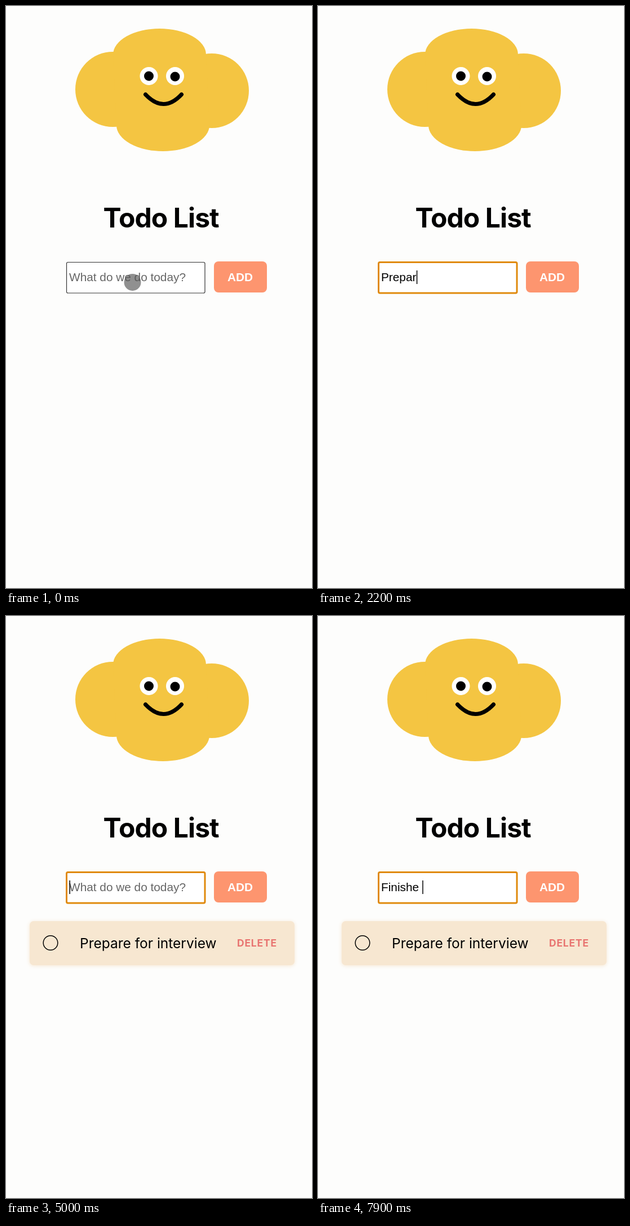
Write an HTML page that moves like this. It is 543 by 1030 pixels and loops after 8 s.

```html
<!DOCTYPE html>
<html lang="en">
<head>
<meta charset="utf-8">
<title>Todo List</title>
<style>
  html, body { margin: 0; width: 100%; height: 100%; overflow: hidden; background: #fdfdfc; }
  svg { display: block; width: 543px; height: 1030px; }
  text { white-space: pre; font-family: Inter, sans-serif; }
  .field { font: 20.8px "Liberation Sans", Arial, sans-serif; }
</style>
</head>
<body>
<svg viewBox="0 0 543 1030">
  <g fill="#f4c542">
    <circle cx="189.500" cy="147.500" r="66.500"/>
    <circle cx="365" cy="150" r="66"/>
    <ellipse cx="272.500" cy="86" rx="82.500" ry="46"/>
    <ellipse cx="278.500" cy="211" rx="82.500" ry="46"/>
    <path d="M190 86H355L361 211H196Z"/>
  </g>
  <g fill="#fff"><circle cx="253.500" cy="124" r="16"/><circle cx="300" cy="124" r="16"/></g>
  <circle cx="253.500" cy="124" r="8.500"/><circle cx="300" cy="125" r="8.500"/>
  <path d="M247.500 156.500Q279.500 190.500 311.500 156.500" fill="none" stroke="#000" stroke-width="7" stroke-linecap="round"/>

  <text x="172.500" y="392" font-size="48" font-weight="700" letter-spacing="-0.9">Todo List</text>

  <rect id="box" x="107.500" y="453.500" width="245.500" height="54.500" rx="2.500" fill="#fff"/>
  <text id="entry" class="field" x="112" y="487"></text>
  <rect id="caret" y="468" width="1.500" height="24"/>
  <rect x="369" y="452" width="94" height="55" rx="8" fill="#fd956f"/>
  <text class="field" x="393" y="487" fill="#fff" style="font-weight:700">ADD</text>

  <g id="item">
    <rect x="42" y="540" width="470" height="78" rx="7" fill="#f7e7d1" style="filter:drop-shadow(0 1px 3px #f7e7d1)"/>
    <circle cx="79" cy="578.500" r="12.800" fill="none" stroke="#000" stroke-width="1.500"/>
    <text x="131" y="588" font-size="24.500">Prepare for interview</text>
    <text x="410" y="585" font-size="17.500" font-weight="700" letter-spacing="0.8" fill="#e87470">DELETE</text>
  </g>

  <circle id="touch" r="15" fill="#555" fill-opacity=".65"/>
  <path id="move" transform="translate(243 481)" stroke="#fff" stroke-width="1.500" paint-order="stroke" stroke-linejoin="round"
    d="M0-12L5-6H1.500V-1.500H6V-5L12 0L6 5V1.500H1.500V6H5L0 12L-5 6H-1.500V1.500H-6V5L-12 0L-6-5V-1.500H-1.500V-6H-5Z"/>
</svg>
<script>
const LOOP = 8000, FOCUS = 400, SWAP = 1000, SUBMIT = 5000;
const [box, entry, caret, item, touch, move] =
  ["box", "entry", "caret", "item", "touch", "move"].map(id => document.getElementById(id));

// Each keystroke has its own time.
const first = "Prepare for interview";
const firstKeys = [1400, 1700, 1800, 2000, 2100, 2200, 2400, 2600, 2800, 2900, 3100, 3300,
  3500, 3700, 3900, 4000, 4200, 4300, 4400, 4500, 4700];
const second = "Finishe ";
const secondKeys = [6300, 6600, 6700, 6800, 7000, 7200, 7700, 7900];

const typed = (text, keys, t) => text.slice(0, keys.filter(k => k <= t).length);
const show = (el, on) => el.setAttribute("visibility", on ? "visible" : "hidden");

function set(el, attrs) {
  for (const name in attrs) el.setAttribute(name, attrs[name]);
}

function draw(t) {
  const focused = t >= FOCUS;
  const value = t < SUBMIT ? typed(first, firstKeys, t) : typed(second, secondKeys, t);
  set(box, { stroke: focused ? "#e08a0c" : "#333", "stroke-width": focused ? 3 : 1.2 });

  entry.textContent = value || "What do we do today?";
  entry.setAttribute("fill", value ? "#000" : "#666");
  const width = value ? entry.getComputedTextLength() : 0;
  const blink = t >= 5600 && t < 6000 ? (t < 5700 ? 0.5 : 0) : 1;
  set(caret, { x: 112.4 + width, opacity: focused ? blink : 0 });

  const p = Math.min(1, Math.max(0, t / FOCUS));
  set(touch, { cx: 224.5 + 18.5 * p, cy: 489 - 8 * p });
  show(touch, t < SWAP);
  show(move, t >= SWAP && t < firstKeys[0]);
  show(item, t >= SUBMIT);
}

const start = performance.now();
function tick() {
  // The picture advances in steps of a tenth of a second.
  draw(Math.floor((performance.now() - start) % LOOP / 100) * 100);
  requestAnimationFrame(tick);
}
tick();
</script>
</body>
</html>
```
